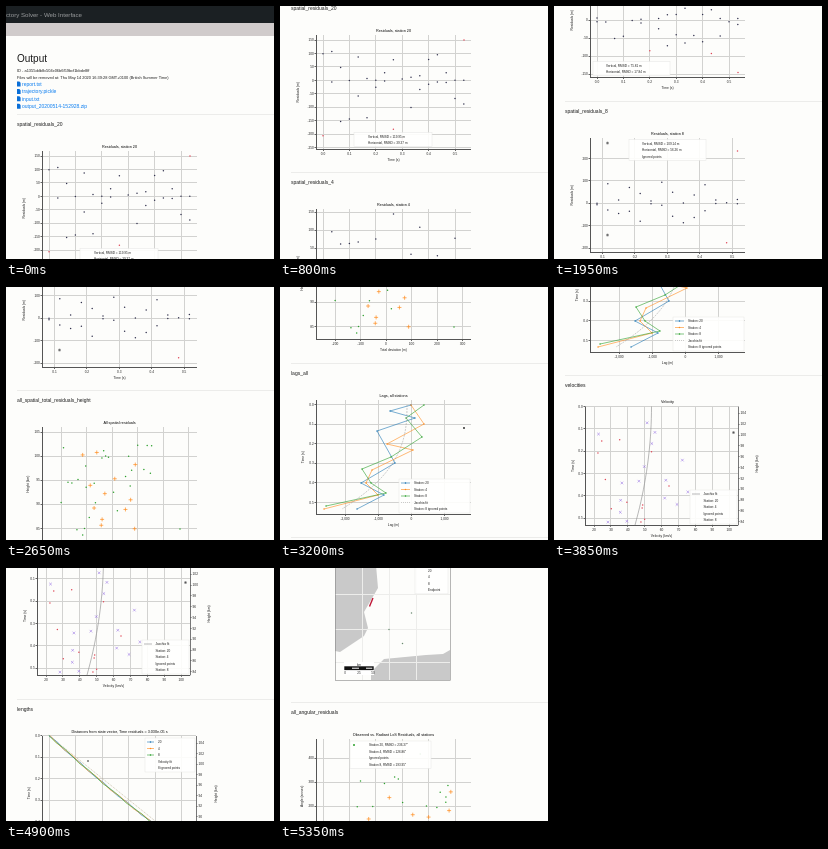
An HTML page with a canvas for the animation above (5400 ms loop, 268x253 px).

```html
<!DOCTYPE html>
<html lang="en">
<head>
<meta charset="utf-8">
<title>Output</title>
<style>
html, body { margin: 0; width: 100%; height: 100%; overflow: hidden; background: #fdfdfb; }
canvas { display: block; width: 268px; height: 253px; }
</style>
</head>
<body>
<canvas id="stage" width="268" height="253"></canvas>
<script>
const ctx = document.getElementById('stage').getContext('2d');
const LOOP = 5400, FIRST = 118, PITCH = 174.4;
const SANS = '"Liberation Sans", Arial, sans-serif';
const BLUE = '#1f77b4', ORANGE = '#ff8c1e', GREEN = '#2ca02c';
const RED = '#e04858', NAVY = '#33334f', PURPLE = '#8a60e0', INK = '#1a1a1a', GRID = '#d2d2d0';
const COLORS = [BLUE, ORANGE, GREEN];

// [time, scroll offset]
const SCROLL = [[0, 0], [550, 0], [800, 116], [1950, 362], [2750, 556], [3200, 730],
  [3850, 892], [4400, 1017], [4900, 1023], [5350, 1369], [5400, 1372]];

// Monotone cubic through the scroll stops
function scrollAt(t) {
  let i = 0;
  while (i < SCROLL.length - 2 && t >= SCROLL[i + 1][0]) i++;
  const rate = k => {
    const a = SCROLL[k], b = SCROLL[k + 1];
    return a && b ? (b[1] - a[1]) / (b[0] - a[0]) : 0;
  };
  const slope = k => {
    const p = rate(k - 1), q = rate(k);
    return p * q > 0 ? 2 * p * q / (p + q) : 0;
  };
  const [t0, y0] = SCROLL[i], [t1, y1] = SCROLL[i + 1];
  const d = t1 - t0, u = (t - t0) / d, v = 1 - u;
  return y0 * v * v * (1 + 2 * u) + slope(i) * d * u * v * v
    + y1 * u * u * (3 - 2 * u) - slope(i + 1) * d * u * u * v;
}

function random(seed) {
  let s = seed * 7919;
  const next = () => (s = s * 16807 % 2147483647) / 2147483647;
  next();
  return next;
}

const range = (n, f) => Array.from({ length: n }, (_, i) => f(i));
const steps = (a, d, n) => range(n, i => String(a + d * i));
const tenths = (a, n) => range(n, i => ((a + i) / 10).toFixed(1));

function text(s, x, y, size = 3.2, align = 'left', color = INK) {
  ctx.font = size + 'px ' + SANS;
  ctx.textAlign = align;
  ctx.textBaseline = 'alphabetic';
  ctx.fillStyle = color;
  ctx.fillText(s, x, y + size * 0.36);
}

function sideText(s, x, y) {
  ctx.save();
  ctx.translate(x, y);
  ctx.rotate(-Math.PI / 2);
  text(s, 0, 0, 3.3, 'center');
  ctx.restore();
}

function path(pts, color, width = 0.6, dash = []) {
  ctx.strokeStyle = color;
  ctx.lineWidth = width;
  ctx.setLineDash(dash);
  ctx.beginPath();
  pts.forEach(p => ctx.lineTo(...p));
  ctx.stroke();
  ctx.setLineDash([]);
}

function shape(pts, color) {
  ctx.fillStyle = color;
  ctx.beginPath();
  pts.forEach(p => ctx.lineTo(...p));
  ctx.fill();
}

// Rules one pixel wide, kept on whole pixels
function hline(x0, x1, y, color) {
  ctx.fillStyle = color;
  ctx.fillRect(x0, Math.floor(y), x1 - x0, 1);
}

function vline(x, y0, y1, color) {
  ctx.fillStyle = color;
  ctx.fillRect(Math.floor(x), y0, 1, y1 - y0);
}

function dot(x, y, color = NAVY, r = 0.75) {
  ctx.fillStyle = color;
  ctx.beginPath();
  ctx.arc(x, y, r, 0, 7);
  ctx.fill();
}

function plus(x, y) {
  path([[x - 2, y], [x + 2, y]], ORANGE, 0.7);
  path([[x, y - 2], [x, y + 2]], ORANGE, 0.7);
}

function cross(x, y) {
  path([[x - 1.3, y - 1.3], [x + 1.3, y + 1.3]], PURPLE, 0.5);
  path([[x - 1.3, y + 1.3], [x + 1.3, y - 1.3]], PURPLE, 0.5);
}

function ring(x, y) {
  dot(x, y, '#a0a0a0', 1.5);
  dot(x, y, '#555', 0.7);
}

function scatter(seed, n, [x0, x1], [y0, y1], mark) {
  const rnd = random(seed);
  range(n, () => mark(x0 + rnd() * (x1 - x0), y0 + rnd() * (y1 - y0)));
}

// One point above and one below the zero line at each time
function residuals(seed, n, dx, zero, up, down) {
  const rnd = random(seed);
  range(n, i => {
    const low = down * rnd() ** 2;
    dot(43 + i * dx, zero - up * rnd() ** 2);
    dot(43 + i * dx, zero + low, low > down * 0.75 ? RED : NAVY);
  });
}

// Each tick list: labels, first position, spacing
function axes(o) {
  const { left = 36, right = 191, top = 27, bottom = 141.5 } = o;
  const [xs, x0, dx] = o.x, [ys, y0, dy] = o.y;
  xs.forEach((s, i) => {
    const x = x0 + i * dx;
    vline(x, top, bottom, GRID);
    vline(x, bottom, bottom + 1.5, '#666');
    text(s, x, bottom + 4.2, 3.2, 'center');
  });
  ys.forEach((s, i) => {
    const y = y0 + i * dy;
    hline(left, right, y, GRID);
    hline(left - 1.5, left, y, '#666');
    text(s, left - 2.2, y, 3.2, 'right');
  });
  vline(left, top, bottom, '#555');
  hline(left, right, bottom, '#555');
  if (o.right2) {
    const [rs, r0, dr] = o.right2;
    vline(right, top, bottom, '#777');
    rs.forEach((s, i) => {
      hline(right, right + 1.5, r0 + i * dr, '#666');
      text(s, right + 2.6, r0 + i * dr);
    });
  }
  text(o.title, 113.5, o.titleY || 22.5, 3.77, 'center', '#000');
  text(o.xlabel, (left + right) / 2, bottom + 10.7, 3.3, 'center');
  sideText(o.ylabel, o.ylabelX || 17.5, (top + bottom) / 2);
}

function legend(x, y, w, rows, textX) {
  const h = rows.length * 6.6 + 1;
  ctx.fillStyle = 'rgba(255,255,254,0.9)';
  ctx.fillRect(x, y, w, h);
  ctx.strokeStyle = '#e6e6e4';
  ctx.lineWidth = 0.5;
  ctx.strokeRect(x, y, w, h);
  rows.forEach((s, i) => text(s, textX, y + 4.2 + i * 6.5, 3.1));
}

function keys(x, y, w) {
  COLORS.forEach((c, i) => {
    path([[x, y + i * 6.5], [x + w, y + i * 6.5]], c);
    dot(x + w / 2, y + i * 6.5, c);
  });
}

const timeAxis = [tenths(0, 6), 43, 26.4];
const heightAxis = (y, d) => [steps(104, -2, 11), y, d];

function station20() {
  axes({ title: 'Residuals, station 20', xlabel: 'Time (s)', ylabel: 'Residuals (m)',
    x: timeAxis, y: [steps(150, -50, 9), 32, 13.45] });
  residuals(3, 17, 8.8, 72.5, 32, 62);
  dot(184, 32, RED);
  legend(74, 124.5, 78, ['Vertical, RMSD = 119.95 m', 'Horizontal, RMSD = 39.37 m'], 88);
}

function station4() {
  axes({ title: 'Residuals, station 4', xlabel: 'Time (s)', ylabel: 'Residuals (m)',
    x: timeAxis, y: [steps(150, -50, 7), 30, 18] });
  residuals(5, 17, 8.8, 83.5, 40, 40);
  dot(113.5, 32);
  dot(184, 136.5, RED);
  legend(39, 125.5, 77, ['Vertical, RMSD = 75.81 m', 'Horizontal, RMSD = 17.84 m'], 52);
}

function station8() {
  axes({ title: 'Residuals, station 8', xlabel: 'Time (s)', ylabel: 'Residuals (m)',
    x: [tenths(1, 5), 48.5, 32.4], y: [steps(200, -100, 5), 47.5, 22.4] });
  residuals(8, 14, 10.8, 92.5, 26, 40);
  dot(183.5, 40, RED);
  ring(53.5, 32);
  ring(53.5, 124);
  legend(75, 28.5, 77, ['Vertical, RMSD = 109.14 m', 'Horizontal, RMSD = 56.26 m',
    'Ignored points'], 88);
}

function deviations() {
  axes({ title: 'All spatial residuals', xlabel: 'Total deviation (m)', ylabel: 'Height (km)',
    ylabelX: 22, x: [steps(-200, 100, 6), 55, 25.5], y: [steps(105, -5, 5), 32, 24.1] });
  scatter(4, 28, [52, 146], [38, 136], (x, y) => dot(x, y, GREEN));
  scatter(9, 12, [68, 130], [40, 133], plus);
  dot(174, 129, GREEN);
}

function lags() {
  axes({ title: 'Lags, all stations', xlabel: 'Lag (m)', ylabel: 'Time (s)', ylabelX: 23,
    x: [['-2,000', '-1,000', '0', '1,000'], 65, 33.2], y: [tenths(0, 6), 31.5, 19.6] });
  const tracks = [
    [[131, 32], [110, 38], [135, 45], [97, 58], [115, 90], [81, 110], [104, 122], [77, 136]],
    [[131, 32], [144, 51], [107, 71], [133, 77], [92, 97], [86, 110], [98, 122], [44, 136]],
    [[144, 32], [126, 45], [142, 64], [111, 84], [82, 96], [91, 110], [106, 120], [46, 133]]
  ];
  tracks.forEach((pts, i) => {
    path(pts, COLORS[i], 0.6);
    pts.forEach(p => dot(...p, COLORS[i], 0.7));
  });
  path(range(21, i => [127 - 65 * (i / 20) ** 2.6, 32 + 5.2 * i]), '#999', 0.5, [2, 1]);
  dot(184, 55, INK, 0.9);
  legend(119, 106, 71, ['Station: 20', 'Station: 4', 'Station: 8', 'Jacchia fit',
    'Station: 8 ignored points'], 134);
  keys(121, 110, 9);
  path([[121, 129.5], [130, 129.5]], '#999', 0.5, [1, 1]);
}

function velocities() {
  axes({ title: 'Velocity', titleY: 17, xlabel: 'Velocity (km/s)', ylabel: 'Time (s)', ylabelX: 18.5,
    left: 31, right: 184, top: 21.5, bottom: 140.3,
    x: [steps(20, 10, 9), 40, 16.9], y: [tenths(0, 6), 21.5, 22.3],
    right2: heightAxis(28.3, 10.85) });
  sideText('Height (km)', 203, 79);
  path(range(21, i => [97.5 - 16.5 * (i / 20) ** 2, 21.5 + 5.93 * i]), '#888', 0.6);
  scatter(6, 16, [37, 134], [28, 138], cross);
  scatter(11, 12, [36, 130], [54, 138], (x, y) => dot(x, y, RED));
  ring(179.5, 47.5);
  legend(136, 105, 47, ['Jacchia fit', 'Station: 20', 'Station: 4', 'Ignored points',
    'Station: 8'], 149.5);
  path([[138, 109], [146, 109]], '#888');
}

function lengths() {
  axes({ title: 'Distances from state vector, Time residuals = 3.030e-05 s',
    xlabel: 'Length (km)', ylabel: 'Time (s)', ylabelX: 23, right: 190,
    x: [steps(0, 5, 6), 43, 26.5], y: [tenths(0, 6), 26.5, 21.6],
    right2: heightAxis(34, 10.5) });
  sideText('Height (km)', 209.5, 85);
  path([[43, 26.5], [179, 136]], '#b0a080', 0.6, [1, 1]);
  COLORS.forEach((c, k) => path(range(18, i => {
    const u = i / 17;
    return [43 + 132 * u + Math.sin(i * 2 + k * 1.7) * 1.1, 26.5 + 109 * u + 3 * Math.sin(u * Math.PI)];
  }), c, 0.6));
  dot(82, 52, INK, 0.8);
  legend(139, 29, 50, ['20', '4', '8', 'Velocity fit', '8 ignored points'], 152);
  keys(141, 33, 7);
}

function groundTrack() {
  const land = '#c9c9c9';
  shape([[55, 27], [96, 27], [98, 50], [84, 74], [88, 90], [84, 98], [60, 114], [55, 113]], land);
  shape([[91, 142], [91, 134], [104, 121], [146, 117], [163, 116], [170, 112], [170, 142]], land);
  [82, 109, 136].forEach(x => vline(x, 27, 142, '#ededeb'));
  [56, 91, 124].forEach(y => hline(55, 170, y, '#ededeb'));
  ctx.strokeStyle = '#888';
  ctx.lineWidth = 0.6;
  ctx.strokeRect(55.5, 27.5, 115, 115);
  path([[89.5, 68.5], [93, 60]], '#c01838', 1.4);
  [[131.5, 75], [109, 91.5], [122.5, 105.5]].forEach(p => dot(...p, '#6a8a70'));
  ctx.fillStyle = '#fff';
  ctx.fillRect(64, 124, 30, 13);
  range(4, i => {
    ctx.fillStyle = i % 2 ? '#fff' : '#111';
    ctx.fillRect(65 + i * 7, 129, 7, 2.4);
  });
  ctx.strokeStyle = '#111';
  ctx.strokeRect(65, 129, 28, 2.4);
  text('km', 79, 127, 3, 'center');
  steps(0, 25, 3).forEach((s, i) => text(s, 65 + i * 14, 135, 3, 'center'));
  legend(135, 28.5, 33, ['20', '4', '8', 'Endpoint'], 148);
}

function angular() {
  axes({ title: 'Observed vs. Radiant LoS Residuals, all stations', xlabel: 'Time (s)',
    ylabel: 'Angle (arcsec)', ylabelX: 22, x: timeAxis, y: [steps(400, -100, 5), 46, 24] });
  scatter(7, 14, [43, 184], [36, 102], (x, y) => dot(x, y, GREEN));
  scatter(2, 6, [78, 184], [77, 108], plus);
  legend(70, 29, 81, ['Station 20, RMSD = 236.37"', 'Station 4, RMSD = 126.86"',
    'Ignored points', 'Station 8, RMSD = 193.95"'], 89);
  dot(74, 33, GREEN, 1);
}

const SECTIONS = [
  ['spatial_residuals_20', station20], ['spatial_residuals_4', station4],
  ['spatial_residuals_8', station8], ['all_spatial_total_residuals_height', deviations],
  ['lags_all', lags], ['velocities', velocities], ['lengths', lengths],
  ['ground_track', groundTrack], ['all_angular_residuals', angular]
];

function header() {
  ctx.fillStyle = '#1b2023';
  ctx.fillRect(0, 0, 268, 17);
  ctx.fillStyle = '#d0cbcb';
  ctx.fillRect(0, 17, 268, 13);
  text('ctory Solver - Web Interface', 0, 8.5, 6.15, 'left', '#9a9c9e');
  text('Output', 11, 52.5, 10);
  text('ID - a1355ddb8c504c06b6f59bcf1bbde8ff', 11, 65, 3.95);
  text('Files will be removed at: Thu May 14 2020 16:39:28 GMT+0100 (British Summer Time)', 11, 71.5, 3.95);
  ['report.txt', 'trajectory.pickle', 'input.txt', 'output_20200514-152928.zip'].forEach((s, i) => {
    const y = 78 + i * 7.4;
    shape([[11, y - 2.5], [13.3, y - 2.5], [14.6, y - 1.2], [14.6, y + 2.5], [11, y + 2.5]], '#0a6fd8');
    text(s, 16, y, 5, 'left', '#087cf0');
  });
}

function draw(time) {
  const y = Math.round(scrollAt(time));
  ctx.fillStyle = '#fdfdfb';
  ctx.fillRect(0, 0, 268, 253);
  ctx.save();
  ctx.translate(0, -y);
  header();
  SECTIONS.forEach(([name, plot], i) => {
    const top = Math.round(FIRST + i * PITCH);
    if (top - y > 270 || top - y < -170) return;
    ctx.save();
    ctx.translate(0, top);
    hline(11, 268, -9.5, '#ececea');
    text(name, 11, 0, 5);
    plot();
    ctx.restore();
  });
  ctx.restore();
}

const start = performance.now();
function loop() {
  draw((performance.now() - start) % LOOP);
  requestAnimationFrame(loop);
}
loop();
</script>
</body>
</html>
```
